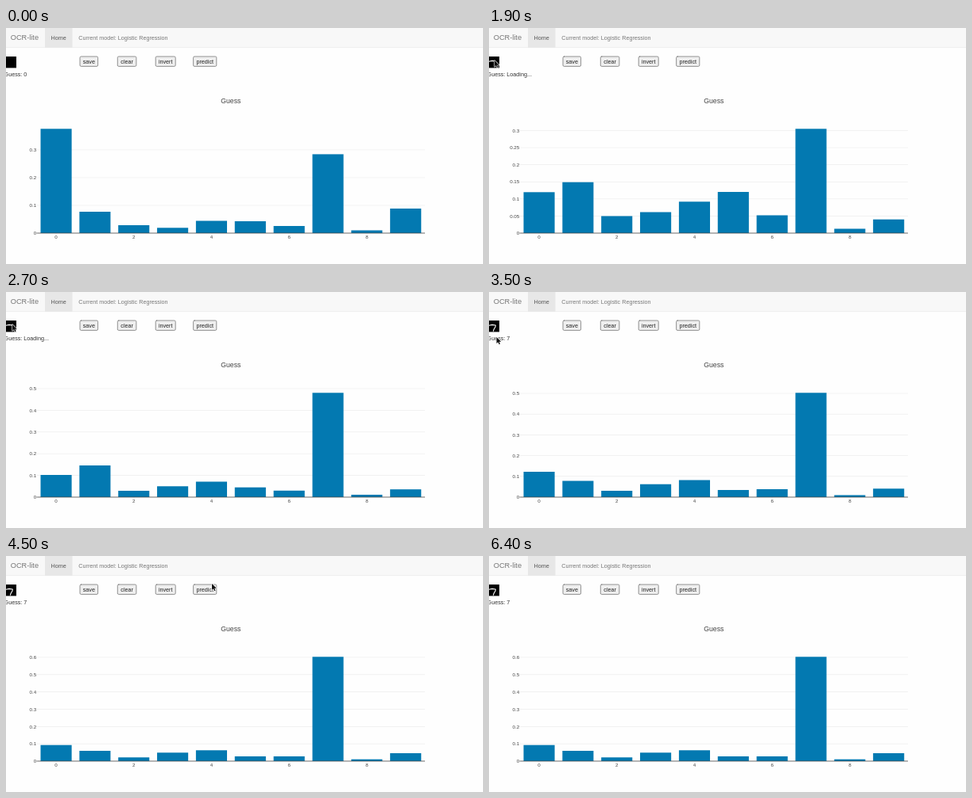
An HTML page with a canvas for the animation above (8.1 s loop, 600 by 298 pixels).

```html
<!DOCTYPE html>
<html lang="en">
<head>
<meta charset="utf-8">
<title>OCR-lite</title>
<style>
html, body { margin: 0; width: 100%; height: 100%; overflow: hidden; background: #fefefe; }
canvas { display: block; width: 600px; height: 298px; }
</style>
</head>
<body>
<canvas id="stage"></canvas>
<script>
const W = 600, H = 298, LOOP = 8100;
const canvas = document.getElementById('stage');
const ctx = canvas.getContext('2d');
const ratio = window.devicePixelRatio || 1;
canvas.width = W * ratio;
canvas.height = H * ratio;

const BASE = 259, PEAK = 131.7, LEFT = 38.5, RIGHT = 527;

// Bar heights in pixels; the tallest bar always fills PEAK.
const charts = [
  { at: 0, max: 0.376, step: 0.1, bars: [131.7, 27, 10, 6.7, 15.5, 15, 9, 99.6, 3.5, 31] },
  { at: 1800, max: 0.305, step: 0.05, bars: [51.7, 64.3, 21.5, 26.5, 39.7, 52, 22.5, 131.7, 5.5, 17.3] },
  { at: 2700, max: 0.4806, step: 0.1, bars: [28, 40, 8, 13.7, 19.5, 12.3, 8.2, 131.7, 3, 9.8] },
  { at: 3300, max: 0.5027, step: 0.1, bars: [32, 20.5, 8, 16.3, 21.5, 9, 10, 131.7, 2.5, 10.7] },
  { at: 3700, max: 0.603, step: 0.1, bars: [20.3, 13, 4.7, 10.7, 13.7, 6, 6, 131.7, 2.3, 10] }
];

const guesses = [
  { at: 0, text: '0' },
  { at: 1500, text: 'Loading...' },
  { at: 3300, text: '7' }
];

// Pointer tip; entries without x hide it.
const pointer = [
  { at: 0 }, { at: 100, x: 57, y: 26 }, { at: 200 },
  { at: 1500, x: 2, y: 41 }, { at: 1800, x: 4, y: 41 }, { at: 1900, x: 7, y: 41 },
  { at: 2400, x: 8, y: 40.5 }, { at: 2700, x: 8, y: 41 }, { at: 2800, x: 8, y: 43 },
  { at: 2900, x: 7, y: 45 }, { at: 3000, x: 6, y: 47 }, { at: 3100, x: 5, y: 49 },
  { at: 3300, x: 7, y: 53 }, { at: 3400, x: 9, y: 56 }, { at: 3500, x: 9.5, y: 57 },
  { at: 3800, x: 30, y: 55 }, { at: 3900, x: 80, y: 50 }, { at: 4000, x: 140, y: 43 },
  { at: 4100, x: 188, y: 40 }, { at: 4200, x: 214, y: 38 }, { at: 4300, x: 238, y: 36 },
  { at: 4400, x: 254, y: 35 }, { at: 4500, x: 259, y: 35 },
  { at: 5000, x: 262, y: 38 }, { at: 5100, x: 258, y: 48 }, { at: 5200, x: 234, y: 40 },
  { at: 5300, x: 205, y: 20 }, { at: 5400, x: 166, y: 32 },
  { at: 5700, x: 150, y: 80 }, { at: 5800, x: 140, y: 60 }, { at: 5900, x: 131, y: 42 },
  { at: 6400 }
];

// How far along the pen path the digit has been drawn.
const strokes = [
  { at: 0, length: 0 }, { at: 1400, length: 2 }, { at: 1800, length: 5 },
  { at: 1900, length: 7 }, { at: 2100, length: 8 }, { at: 2400, length: 9.5 },
  { at: 2800, length: 11.5 }, { at: 2900, length: 13.5 }, { at: 3000, length: 15.5 },
  { at: 3100, length: 18 }
];
const penPath = [[-1, 42.5], [1, 42], [4, 41.4], [8.3, 42], [8, 44], [6.2, 47], [5.4, 49.2]];

const current = (list, t) => list.filter(item => item.at <= t).pop();

function rect(x, y, w, h, color) {
  ctx.fillStyle = color;
  ctx.fillRect(x, y, w, h);
}

function label(text, x, y, size, color, align = 'left') {
  ctx.font = size + 'px "Liberation Sans", Arial, sans-serif';
  ctx.textAlign = align;
  ctx.fillStyle = color;
  ctx.fillText(text, x, y);
}

function polyline(points) {
  ctx.beginPath();
  points.forEach(([x, y]) => ctx.lineTo(x, y));
}

function drawNav() {
  rect(0, 0, W, 25, '#f8f8f8');
  rect(0, 24.5, W, 0.6, '#e7e7e7');
  rect(49, 0, 34.5, 24.7, '#e7e7e7');
  label('OCR-lite', 5.8, 15, 9.2, '#777');
  label('Home', 56.6, 14.5, 7.2, '#555');
  label('Current model: Logistic Regression', 91.3, 14.5, 7.2, '#777');
}

function drawButton(text, x, w) {
  ctx.beginPath();
  ctx.roundRect(x, 36, w, 12.4, 1.5);
  ctx.fillStyle = '#efefef';
  ctx.fill();
  ctx.strokeStyle = '#767676';
  ctx.lineWidth = 0.8;
  ctx.stroke();
  label(text, x + w / 2, 44.7, 7.2, '#222', 'center');
}

function drawPad(length) {
  rect(-1.4, 36, 14.4, 14.4, '#000');
  if (!length) return;
  const drawn = [penPath[0]];
  for (let i = 1; i < penPath.length && length > 0; i++) {
    const [ax, ay] = penPath[i - 1], [bx, by] = penPath[i];
    const span = Math.hypot(bx - ax, by - ay);
    const part = Math.min(1, length / span);
    drawn.push([ax + (bx - ax) * part, ay + (by - ay) * part]);
    length -= span;
  }
  polyline(drawn);
  ctx.strokeStyle = '#fff';
  ctx.lineWidth = 1.1;
  ctx.lineCap = ctx.lineJoin = 'round';
  ctx.stroke();
}

function drawChart({ max, step, bars }) {
  label('Guess', 282.8, 94.5, 8.7, '#444', 'center');
  const ticks = Math.floor(max * 1.052 / step + 1e-6);
  for (let i = 0; i <= ticks; i++) {
    const value = i * step, y = BASE - value / max * PEAK;
    if (i) rect(LEFT, y - 0.3, RIGHT - LEFT, 0.6, '#eaeaea');
    label(String(+value.toFixed(2)), 38.2, y + 2.2, 6.2, '#444', 'right');
  }
  bars.forEach((h, i) => {
    const x = 43.5 + i * 48.85;
    rect(x, BASE - h, 39.1, h, '#0379b1');
    if (i % 2 === 0) label(String(i), x + 19.55, 265.8, 6.2, '#444', 'center');
  });
  rect(LEFT, BASE - 0.4, RIGHT - LEFT, 0.8, '#444');
}

function drawPointer({ x, y }) {
  if (x === undefined) return;
  ctx.save();
  ctx.translate(x, y);
  polyline([[0, 0], [0, 8], [1.9, 6.3], [3.2, 9.2], [4.5, 8.6], [3.2, 5.8], [5.8, 5.7]]);
  ctx.closePath();
  ctx.lineJoin = 'round';
  ctx.lineWidth = 1.2;
  ctx.strokeStyle = '#fff';
  ctx.stroke();
  ctx.fillStyle = '#111';
  ctx.fill();
  ctx.restore();
}

function render(t) {
  ctx.setTransform(ratio, 0, 0, ratio, 0, 0);
  rect(0, 0, W, H, '#fefefe');
  drawNav();
  drawPad(current(strokes, t).length);
  label('Guess: ' + current(guesses, t).text, -2.4, 61, 7.2, '#333');
  drawButton('save', 93, 22.6);
  drawButton('clear', 140.3, 23.6);
  drawButton('invert', 188.2, 25);
  drawButton('predict', 235.6, 29.2);
  drawChart(current(charts, t));
  drawPointer(current(pointer, t));
}

const start = performance.now();
function tick() {
  render((performance.now() - start) % LOOP);
  requestAnimationFrame(tick);
}
tick();
</script>
</body>
</html>
```
